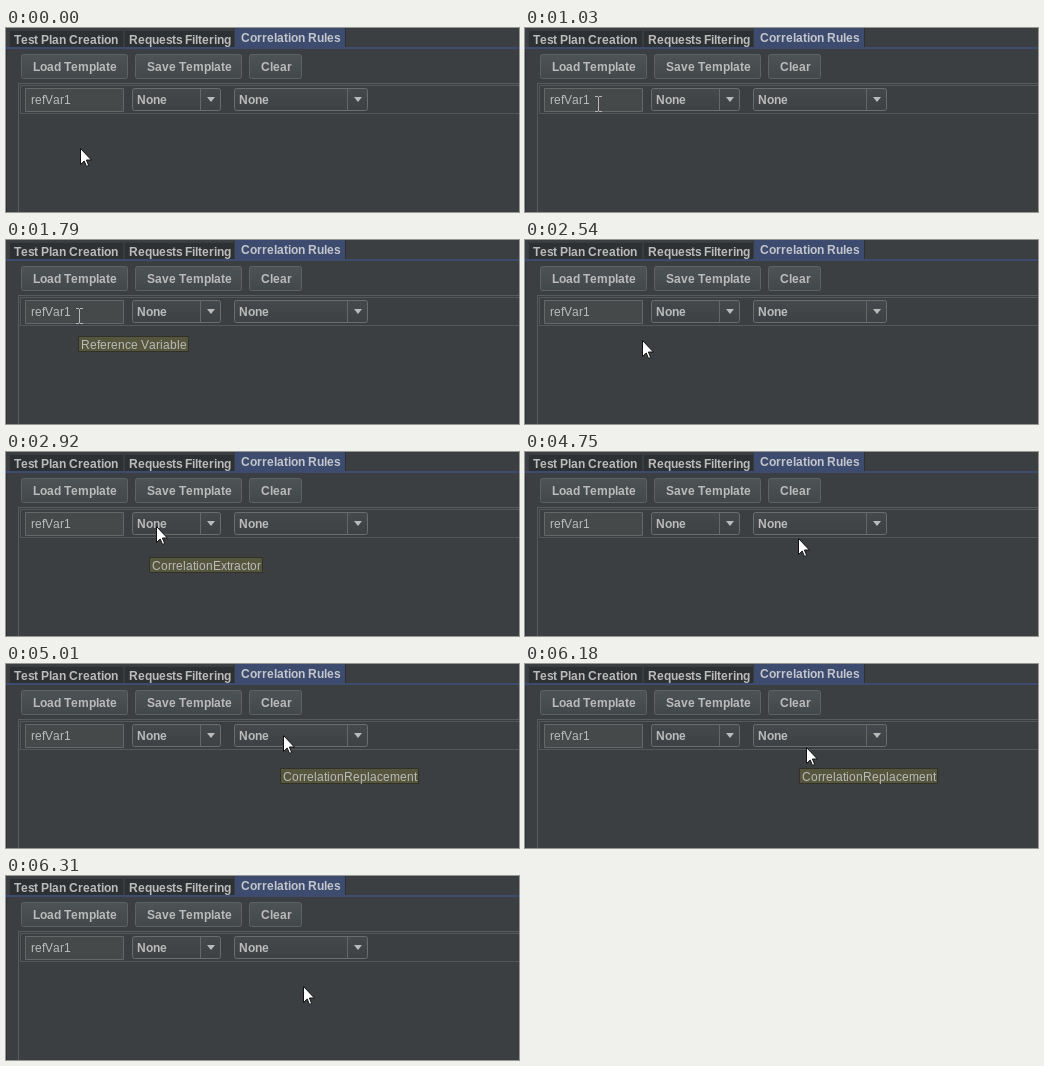
Animation of 513 by 184 pixels, one loop 6380 ms. Source, as an HTML page with a canvas:

```html
<!DOCTYPE html>
<html lang="en">
<head>
<meta charset="utf-8">
<title>Correlation rules</title>
<style>
  html, body { margin: 0; width: 100%; height: 100%; overflow: hidden; background: #3c3f41; }
  canvas { display: block; }
</style>
</head>
<body>
<canvas id="stage" width="513" height="184"></canvas>
<script>
const ctx = document.getElementById('stage').getContext('2d');
const LOOP = 6380;
const FONT = '12px "Liberation Sans", Arial, sans-serif';
const LINE = '#595c5e';
const BLUE = '#3d4b6e';

// Each move eases from the last place to `to`, bending towards `via`
const home = [74, 120];
const moves = [
  { start: 380, end: 1030, steps: 11, via: [75, 97], to: [73, 76] },
  { start: 2350, end: 2920, steps: 10, via: [148, 129], to: [150, 74] },
  { start: 4180, end: 4750, steps: 9, via: [215, 142], to: [273, 86] },
  { start: 4815, end: 5010, steps: 4, via: [274, 80], to: [277, 71] },
  { start: 6180, end: 6310, steps: 3, via: [284, 95], to: [297, 110] }
];

const tips = [
  { from: 1790, until: 2413, x: 72, y: 96, label: 'Reference Variable' },
  { from: 2730, until: 4250, x: 143, y: 105, label: 'CorrelationExtractor' },
  { from: 4815, until: 6245, x: 274, y: 104, label: 'CorrelationReplacement' }
];

function rect(x, y, w, h, color) {
  ctx.fillStyle = color;
  ctx.fillRect(x, y, w, h);
}

function box(x, y, w, h, fill, border, radius = 0) {
  ctx.beginPath();
  ctx.roundRect(x + .5, y + .5, w - 1, h - 1, radius);
  ctx.fillStyle = fill;
  ctx.fill();
  ctx.strokeStyle = border;
  ctx.stroke();
}

function shade(y, h, top, bottom) {
  const g = ctx.createLinearGradient(0, y, 0, y + h);
  g.addColorStop(0, top);
  g.addColorStop(1, bottom);
  return g;
}

// Whole-pixel advances, as in hinted desktop text; the bold s is one pixel narrower
function advance(ch, bold) {
  return bold && ch === 's' ? 6 : Math.round(ctx.measureText(ch).width);
}

// Draws the text and returns the x where it ends
function text(str, x, y, bold, color = '#bbbbbb') {
  ctx.font = (bold ? 'bold ' : '') + FONT;
  ctx.fillStyle = color;
  for (const ch of str) {
    ctx.fillText(ch, x, y);
    x += advance(ch, bold);
  }
  return x;
}

function textWidth(str) {
  ctx.font = FONT;
  return [...str].reduce((sum, ch) => sum + advance(ch), 0);
}

function tab(x, w, label) {
  box(x, 2, w, 18, '#2e3133', '#3a3d3f');
  text(label, x + 5, 16, true);
}

function button(x, w, label) {
  box(x, 26, w, 25, shade(26, 25, '#4e5355', '#424749'), '#5e6264', 2);
  text(label, x + 12, 43, true);
}

function combo(x, w) {
  box(x, 60, w, 23, shade(60, 23, '#45494b', '#3d4143'), '#6a6d6f', 2);
  rect(x + w - 21, 61, 1, 21, '#646769');
  text('None', x + 5, 76, true);
  const mid = x + w - 10;
  ctx.beginPath();
  ctx.moveTo(mid - 4, 69);
  ctx.lineTo(mid + 4, 69);
  ctx.lineTo(mid, 74);
  ctx.fillStyle = '#bbbbbb';
  ctx.fill();
}

function drawWindow() {
  rect(0, 0, 513, 184, '#3c3f41');
  tab(3, 115, 'Test Plan Creation');
  tab(118, 111, 'Requests Filtering');
  rect(229, 0, 110, 20, BLUE);
  rect(0, 19, 513, 2, BLUE);
  rect(339, 0, 1, 19, '#2e3133');
  rect(0, 21, 1, 163, '#303335');
  text('Correlation Rules', 235, 14, true, '#c3c6cc');

  button(15, 107, 'Load Template');
  button(129, 107, 'Save Template');
  button(243, 53, 'Clear');

  rect(12, 55, 501, 1, LINE);
  rect(12, 55, 1, 129, LINE);
  box(14, 57, 510, 29, '#3c3f41', '#55585a');

  box(19, 60, 99, 24, '#45494a', '#646769');
  text('refVar1', 25, 76);
  combo(126, 89);
  combo(228, 134);
}

function drawTip({ x, y, label }) {
  box(x, y, textWidth(label) + 5, 16, '#55563d', '#303127');
  text(label, x + 3, y + 13);
}

function drawArrow(x, y) {
  ctx.save();
  ctx.translate(x, y);
  ctx.beginPath();
  for (const [px, py] of [[.5,.5],[.5,16.5],[4.2,13],[6.5,18.4],[8.7,17.5],[6.4,12],[11.4,12]])
    ctx.lineTo(px, py);
  ctx.closePath();
  ctx.fillStyle = '#fff';
  ctx.fill();
  ctx.strokeStyle = '#111';
  ctx.stroke();
  ctx.restore();
}

function drawBeam(x, y) {
  const color = '#bab6b5';
  for (const row of [-8, 7]) {
    rect(x - 3, y + row, 3, 1, color);
    rect(x + 1, y + row, 3, 1, color);
  }
  rect(x, y - 7, 1, 14, color);
}

const ease = u => u * u * (3 - 2 * u);

function pointerAt(t) {
  let place = home;
  for (const { start, end, steps, via, to } of moves) {
    if (t < start) break;
    const step = Math.floor((t - start + 1) / (end - start) * (steps - 1)) + 1;
    const u = ease(Math.min(step / steps, 1));
    const v = 1 - u;
    place = place.map((p, i) => Math.round(v * v * p + 2 * u * v * via[i] + u * u * to[i]));
  }
  return place;
}

function render(t) {
  drawWindow();
  tips.filter(tip => t >= tip.from && t < tip.until).forEach(drawTip);
  const [x, y] = pointerAt(t);
  const overField = x >= 19 && x < 118 && y < 84;
  (overField ? drawBeam : drawArrow)(x, y);
}

const begin = performance.now();
function tick() {
  render((performance.now() - begin) % LOOP);
  requestAnimationFrame(tick);
}
tick();
</script>
</body>
</html>
```
